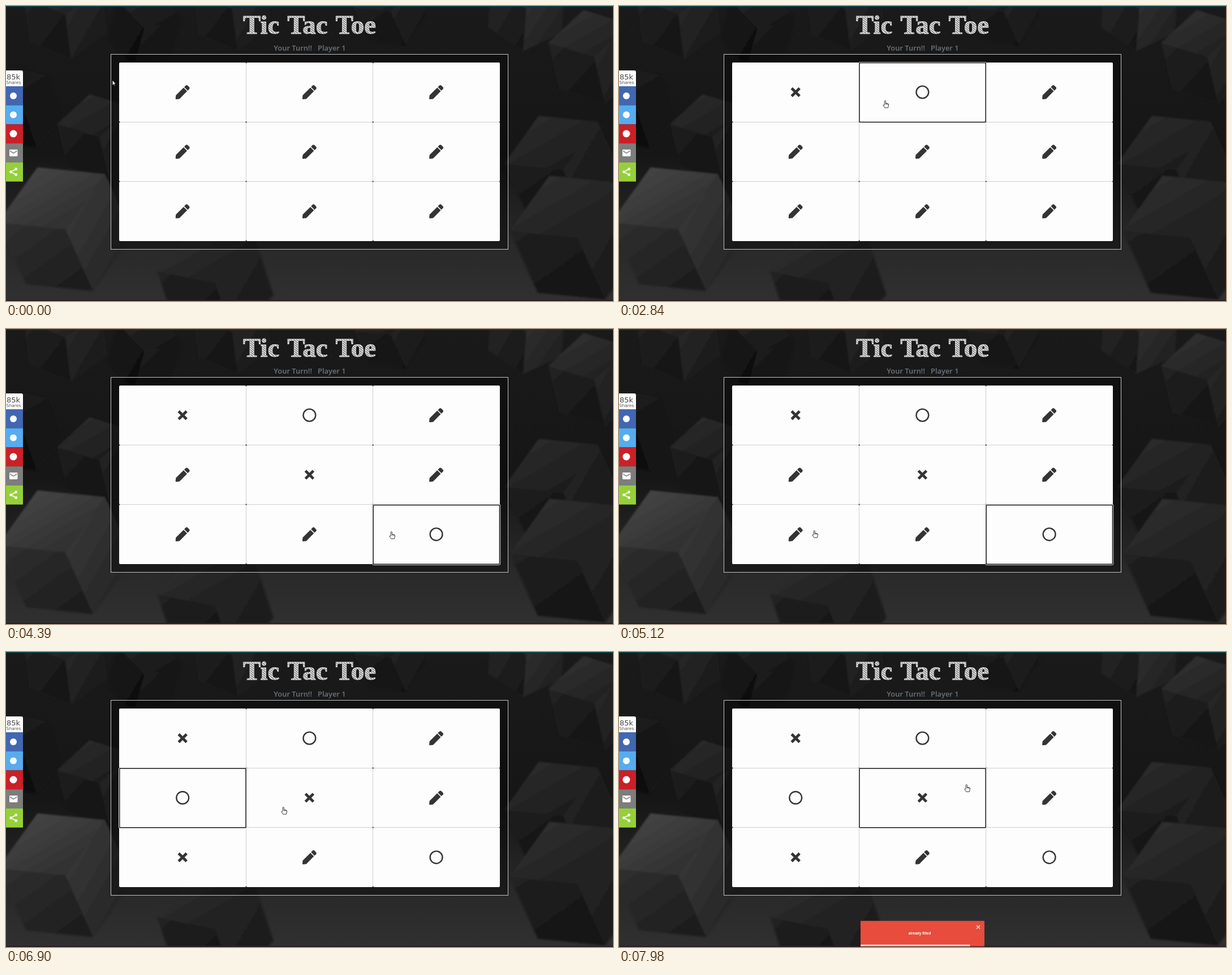
These frames come from a looping animation (1073 by 522 pixels, 8000 ms). An HTML page:

```html
<!DOCTYPE html>
<html lang="en">
<head>
<meta charset="utf-8">
<title>Tic Tac Toe</title>
<style>
html, body { margin: 0; width: 100%; height: 100%; overflow: hidden; background: #1c1c1c; }
svg { display: block; }
text { text-anchor: middle; white-space: pre; }
.title { font: bold 47px "Liberation Serif", serif; word-spacing: 3px; fill: url(#chalk); stroke: #e8e8e8; stroke-width: .8; }
.status { font: 600 12.9px "Open Sans", sans-serif; fill: #6c757d; }
.count { font: 13px "DejaVu Sans", sans-serif; fill: #444; }
.shares { font: 7.6px "DejaVu Sans", sans-serif; fill: #555; }
.toast { font: bold 6.5px "Liberation Sans", sans-serif; fill: #fff; }
</style>
</head>
<body>
<svg width="1073" height="522" viewBox="0 0 1073 522">
  <defs>
    <pattern id="chalk" width="3" height="3" patternUnits="userSpaceOnUse" patternTransform="rotate(40)">
      <rect width="3" height="3" fill="#555"/><rect width="3" height="1.8" fill="#f4f4f4"/>
    </pattern>
    <linearGradient id="room" x2="0" y2="1">
      <stop offset="0" stop-color="#1a1a1a"/><stop offset=".5" stop-color="#161616"/>
      <stop offset=".82" stop-color="#292929"/><stop offset="1" stop-color="#303030"/>
    </linearGradient>
    <linearGradient id="shade" x2="1" y2="1">
      <stop offset="0" stop-opacity="0"/><stop offset="1" stop-opacity=".45"/>
    </linearGradient>
    <filter id="soft"><feGaussianBlur stdDeviation="1.5"/></filter>
    <path id="pen" fill="#343434" d="M1.7-7.9L7.9-1.7L-5.6 11.9L-11.2 12.5Q-12.5 12.5-12.5 11.2L-11.9 5.6ZM11.8-8.9L8.9-11.8Q7.2-13.2 5.5-11.8L2.8-9L9-2.8L11.8-5.5Q13.2-7.2 11.8-8.9Z"/>
    <path id="cross" fill="none" stroke="#343434" stroke-width="4.8" d="M-7-7L7 7M7-7L-7 7"/>
    <circle id="ring" r="10.9" fill="none" stroke="#343434" stroke-width="2.4"/>
  </defs>

  <rect width="1073" height="522" fill="url(#room)"/>
  <g id="cubes" filter="url(#soft)"></g>
  <path fill="#0b454b" d="M0 0H1073V1.5H0Z"/>
  <path fill="#291c20" d="M0 520H1073V522H0Z"/>

  <text class="title" x="536.5" y="49">Tic Tac Toe</text>
  <text class="status" id="status" x="537" y="79"></text>

  <rect x="185.5" y="85.5" width="702" height="345" fill-opacity=".35" stroke="#c4c4c4"/>
  <rect x="200" y="100" width="673" height="316" rx="2" fill="#fdfdfd"/>
  <path stroke="#cfcfcf" d="M424.5 100V416M648.5 100V416M200 205.5H873M200 310.5H873"/>
  <g id="dots" fill="#222"></g>
  <g id="marks"></g>
  <g id="focus" fill="none">
    <rect x="-1.2" y="-1.1" width="225.8" height="107" rx="2" stroke="#fff"/>
    <rect width="223.4" height="104.8" rx="1.5" stroke="#151515" stroke-width="1.5"/>
  </g>

  <path fill="#fff" d="M0 114H27Q30 114 30 117V142H0Z"/>
  <text class="count" x="13" y="129.5">85k</text>
  <text class="shares" x="13.5" y="138">Shares</text>
  <g id="tiles"></g>
  <g fill="#fff">
    <circle cx="13" cy="159" r="6"/><circle cx="13" cy="192.5" r="6"/><circle cx="13" cy="226" r="6.5"/>
    <rect x="6" y="254" width="14.5" height="12" rx="1.4"/>
    <circle cx="8.6" cy="293.5" r="2.4"/><circle cx="17.6" cy="288.5" r="2.4"/><circle cx="17.6" cy="298.5" r="2.4"/>
  </g>
  <path fill="none" stroke="#7d7d7d" stroke-width="1.4" d="M7 256.3L13.2 260.3L19.5 256.3"/>
  <path fill="none" stroke="#fff" stroke-width="1.5" d="M17.6 288.5L8.6 293.5L17.6 298.5"/>

  <g id="toast">
    <rect x="427" width="219" height="45" rx="1" fill="#e74c3c"/>
    <rect id="bar" x="427" y="42" height="3" fill="#f7d5d0"/>
    <text class="toast" x="531.5" y="24">already filled</text>
    <path stroke="#fbe3e0" stroke-width="1.2" d="M632 8L638 14M638 8L632 14"/>
  </g>

  <circle id="glow" r="8.5" fill="#fbf56c" style="mix-blend-mode:multiply"/>
  <path id="cursor" fill="#fff" stroke-width=".9" stroke-linejoin="round"/>
</svg>
<script>
const $ = id => document.getElementById(id);
const LOOP = 8000, CELL_W = 224.2, CELL_H = 105.4;
const place = (id, x, y) => $(id).setAttribute("transform", `translate(${x} ${y})`);
const show = (id, on) => $(id).style.display = on ? "" : "none";

// Three visible faces of a cube, drawn as a turned hexagon.
function cube(x, y, size, grey, turn) {
  const corner = k => {
    const a = turn + k * Math.PI / 3;
    return `${x + size * Math.cos(a)},${y + size * Math.sin(a)}`;
  };
  return [.65, 1, .8].map((light, i) => {
    const g = grey * light, k = 2 * i + 1;
    const points = `${x},${y} ${corner(k)} ${corner(k + 1)} ${corner(k + 2)}`;
    return `<polygon points="${points}" fill="rgb(${g},${g},${g})"/><polygon points="${points}" fill="url(#shade)"/>`;
  }).join("");
}
$("cubes").innerHTML =
  cube(105, 15, 80, 52, .4) + cube(30, 180, 75, 34, .2) + cube(165, 232, 78, 46, .3) +
  cube(245, 40, 70, 38, .8) + cube(400, 5, 75, 50, .4) + cube(680, 10, 65, 46, .1) +
  cube(920, 5, 75, 62, .6) + cube(1040, 90, 85, 52, .3) + cube(985, 290, 105, 46, .1) +
  cube(1010, 410, 120, 50, .1) + cube(105, 395, 120, 74, .1) + cube(370, 490, 105, 50, .2);

$("tiles").innerHTML = ["#4267b2", "#55acee", "#cb2027", "#7d7d7d", "#95d03a"].map((color, i) =>
  `<rect y="${142 + 33.7 * i}" width="30" height="33.8" fill="${color}"/>`).join("");

for (let i = 0; i < 4; i++) for (let j = 0; j < 4; j++)
  if (i % 3 || j % 3)
    $("dots").innerHTML += `<circle cx="${200.4 + CELL_W * i}" cy="${100.3 + 105.1 * j}" r="1.1"/>`;

const icons = [...Array(9).keys()].map(i => {
  const use = document.createElementNS("http://www.w3.org/2000/svg", "use");
  use.setAttribute("transform", `translate(${312.2 + CELL_W * (i % 3)} ${152.5 + CELL_H * (i / 3 | 0)})`);
  return $("marks").appendChild(use);
});

// Each beat moves the pointer, then may press a cell.
const beats = [
  { move: [520, 1070], to: [299, 159], press: 1460, cell: 0 },
  { move: [1840, 2150], to: [470, 156], press: 2460, cell: 1 },
  { move: [2840, 3070], to: [471, 243], press: 3300, cell: 4 },
  { move: [3520, 4010], to: [681, 358], press: 4240, cell: 8 },
  { move: [4560, 5120], to: [345, 356], press: 5350, cell: 6 },
  { move: [5660, 5960], to: [334, 267], press: 6200, cell: 3 },
  { move: [6570, 6980], to: [539, 276], press: 7280, cell: 4 },
  { move: [7670, 7980], to: [614, 234] }
];
const HOLD = 70, PRESS = 150, TOAST = 7402;
const ARROW = "M0 0V9.6L2.2 7.7L3.6 10.6L4.9 10L3.6 7.1H6.4Z";
const HAND = "M-.8 8V1.2Q.3-.4 1.4 1.2V5.2L5.4 6Q6.8 6.4 6.6 8.2L5.4 13.2H-.2L-3.2 8.8Q-2.6 7-.8 8.6M1.4 5.2V7.4M3.4 5.7V7.6M5.2 6.1V7.8";

const mix = (a, b, p) => a + (b - a) * p;
const steps = ms => Math.floor(ms / HOLD) + 1;

function pointer(t) {
  let x = 188, y = 131;
  for (const { move: [start, end], to } of beats) {
    if (t < start) break;
    const p = Math.min(1, steps(t - start) / steps(end - start)) ** 1.5;
    x = mix(x, to[0], p);
    y = mix(y, to[1], p);
  }
  return [x, y];
}

// Rises from far below, overshoots and settles.
function toastTop(age) {
  const keys = [[0, 3000], [.6, -20], [.75, 10], [.9, -5], [1, 0]];
  const p = Math.min(.999, age / 700);
  const i = keys.findIndex(k => k[0] > p);
  const [[a, from], [b, to]] = [keys[i - 1], keys[i]];
  return 479 + mix(from, to, 1 - (1 - (p - a) / (b - a)) ** 3);
}

function draw(t) {
  const [x, y] = pointer(t);
  const hand = x > 200;
  $("cursor").setAttribute("d", hand ? HAND : ARROW);
  $("cursor").setAttribute("stroke", hand ? "#222" : "#000");
  place("cursor", x, y);
  place("glow", x, y);

  const board = Array(9).fill("pen");
  let turn = 0, focus = -1, pressed = false;
  for (const { press, cell } of beats) {
    if (!(t >= press)) break;
    focus = cell;
    pressed = t < press + PRESS;
    if (!pressed && board[cell] === "pen") board[cell] = turn++ % 2 ? "ring" : "cross";
  }
  icons.forEach((icon, i) => icon.setAttribute("href", "#" + board[i]));
  $("status").textContent = turn % 2 ? "Your Turn!! Player 2" : "Your Turn!!\u00a0\u00a0 Player 1";
  show("glow", pressed);
  show("focus", focus >= 0);
  place("focus", 200.7 + CELL_W * (focus % 3), 100.6 + CELL_H * Math.floor(focus / 3));

  const age = t - TOAST;
  show("toast", age > 0);
  if (age > 0) {
    place("toast", 0, toastTop(age));
    $("bar").setAttribute("width", 219 * (1 - age / 5000));
  }
}

function loop() {
  draw(performance.now() % LOOP);
  requestAnimationFrame(loop);
}
loop();
</script>
</body>
</html>
```
